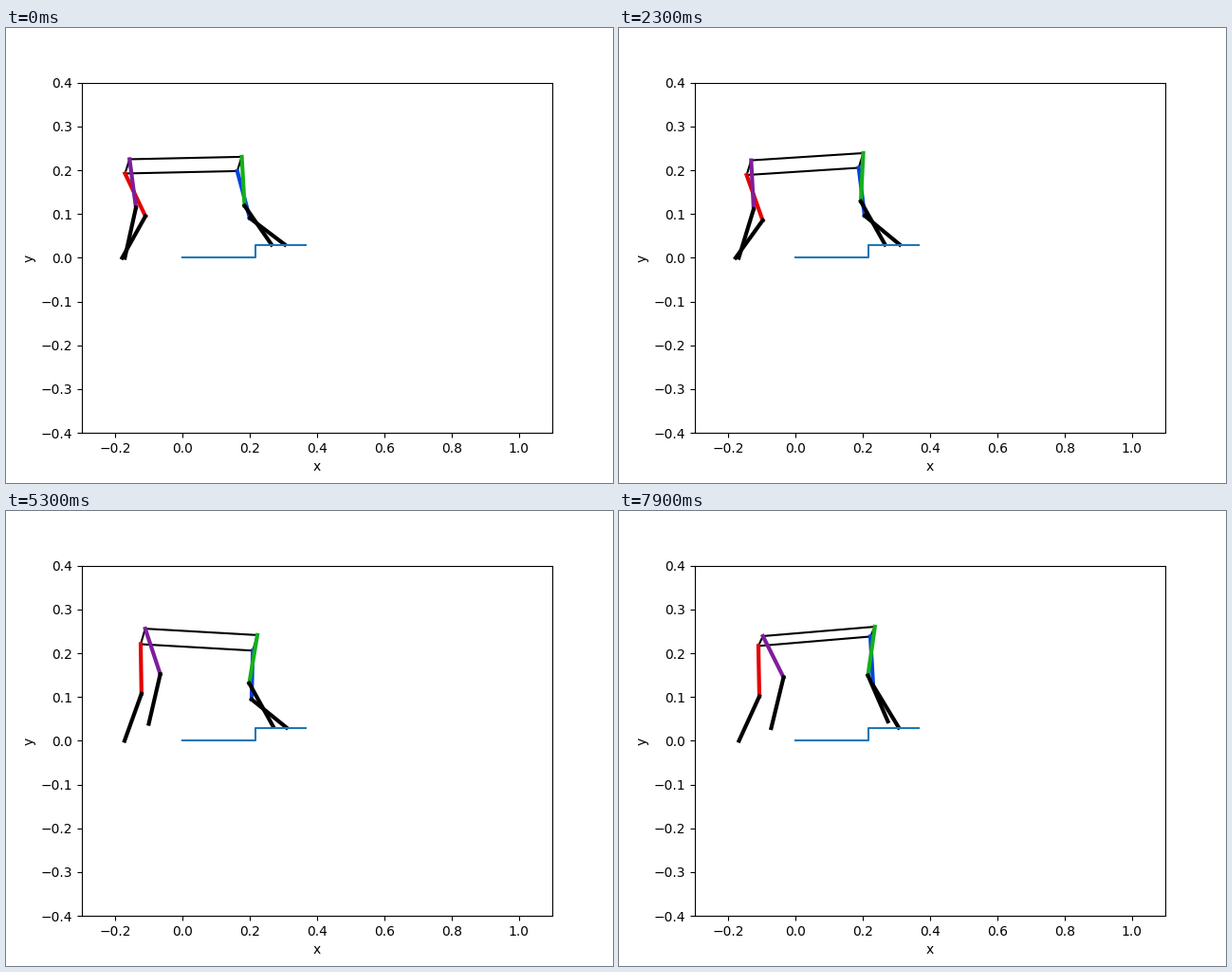
Animation, 640 px wide and 480 px high, one loop 8 s. Source, as a matplotlib script:

```python
import numpy as np
import matplotlib.pyplot as plt
from matplotlib.animation import FuncAnimation

FRAMES, STEP_MS = 80, 100
KEYS = np.array([0, 0.9, 2.3, 3.2, 4.4, 6.2, 7.9])
BODY_LENGTH = 0.334
SIDE_DX = 0.0135


def curve(*vals, monotone=False):
    """Cubic Hermite curve through vals at KEYS."""
    v = np.array(vals)
    h = np.diff(KEYS)
    d = np.diff(v) / h
    m = np.empty_like(v)
    m[0], m[-1] = d[0], d[-1]
    m[1:-1] = (d[:-1] * h[1:] + d[1:] * h[:-1]) / (h[:-1] + h[1:])
    if monotone:
        a, b = d[:-1], d[1:]
        same = a * b > 0
        total = np.where(same, a + b, 1)
        m[1:-1] = np.where(same, 2 * a * b / total, 0)

    def at(t):
        i = min(np.searchsorted(KEYS, t, side="right") - 1, len(h) - 1)
        s = (t - KEYS[i]) / h[i]
        return (v[i] * (1 + 2 * s) * (1 - s) ** 2
                + v[i + 1] * s * s * (3 - 2 * s)
                + h[i] * s * (1 - s) * (m[i] * (1 - s) - m[i + 1] * s))
    return at


def foot(*vals):
    return curve(*vals, monotone=True)


def flat(y):
    return lambda t: y


# body pose: rear right hip, front-to-rear rise, left-to-right rise
rear_x = curve(-.1716, -.163, -.146, -.1377, -.1307, -.1194, -.111)
rear_y = curve(.1925, .186, .189, .201, .2175, .2195, .2165)
pitch = curve(.0055, .0095, .0165, .0005, -.0215, .0005, .0215)
roll = curve(.0325, .0335, .0335, .0355, .038, .031, .0225)

# name: colour, knee x, knee y, foot x, foot y
LEGS = {
    "front_right": (
        "xkcd:blue",
        curve(.1996, .1968, .2052, .2024, .1996, .2137, .2306),
        curve(.0907, .0853, .0961, .0896, .0842, .1091, .1264),
        foot(.304, .3125, .3097, .3097, .3097, .308, .3068),
        foot(.03, .0452, .03, .03, .03, .03, .03)),
    "front_left": (
        "xkcd:green",
        curve(.1841, .1812, .1939, .1925, .1925, .2052, .2151),
        curve(.1188, .1177, .1286, .1264, .1242, .1405, .1491),
        foot(.2645, .2648, .266, .2673, .2682, .2702, .2744),
        foot(.03, .03, .03, .03, .03, .0377, .0442)),
    "rear_right": (
        "xkcd:red",
        curve(-.1109, -.1024, -.0982, -.1052, -.1208, -.1194, -.1081),
        curve(.095, .0885, .0853, .0939, .1048, .1069, .1015),
        foot(-.180, -.1798, -.1787, -.1772, -.1745, -.1716, -.1687),
        flat(0)),
    "rear_left": (
        "xkcd:purple",
        curve(-.1391, -.125, -.125, -.1109, -.0798, -.0573, -.0361),
        curve(.1145, .1113, .1113, .1264, .1491, .1491, .1448),
        foot(-.1721, -.1716, -.1693, -.1645, -.1419, -.0714, -.0728),
        foot(0, 0, 0, .016, .0485, .029, .029)),
}


def hips(t):
    rear = np.array([rear_x(t), rear_y(t)])
    rise = pitch(t)
    along = np.array([np.sqrt(BODY_LENGTH ** 2 - rise ** 2), rise])
    side = np.array([SIDE_DX, roll(t)])
    return {"rear_right": rear, "rear_left": rear + side,
            "front_left": rear + side + along, "front_right": rear + along}


fig, ax = plt.subplots(figsize=(6.4, 4.8), dpi=100)
ax.set(xlim=(-0.3, 1.1), ylim=(-0.4, 0.4), xlabel="x", ylabel="y")

body, = ax.plot([], [], "k", lw=1.5)
limbs = {}
for name, (color, *_) in LEGS.items():
    thigh, = ax.plot([], [], color=color, lw=3)
    shank, = ax.plot([], [], "k", lw=3)
    limbs[name] = thigh, shank
ax.plot([0, .217, .217, .367], [0, 0, .03, .03], color="C0", lw=1.5)


def update(i):
    t = i * STEP_MS / 1000
    hip = hips(t)
    ring = list(hip.values())
    body.set_data(*zip(*ring, ring[0]))
    for name, (_, kx, ky, fx, fy) in LEGS.items():
        knee = kx(t), ky(t)
        thigh, shank = limbs[name]
        thigh.set_data(*zip(hip[name], knee))
        shank.set_data(*zip(knee, (fx(t), fy(t))))
    return [body] + [line for pair in limbs.values() for line in pair]


anim = FuncAnimation(fig, update, frames=FRAMES, interval=STEP_MS,
                     repeat=True, repeat_delay=0)
plt.show()
```
